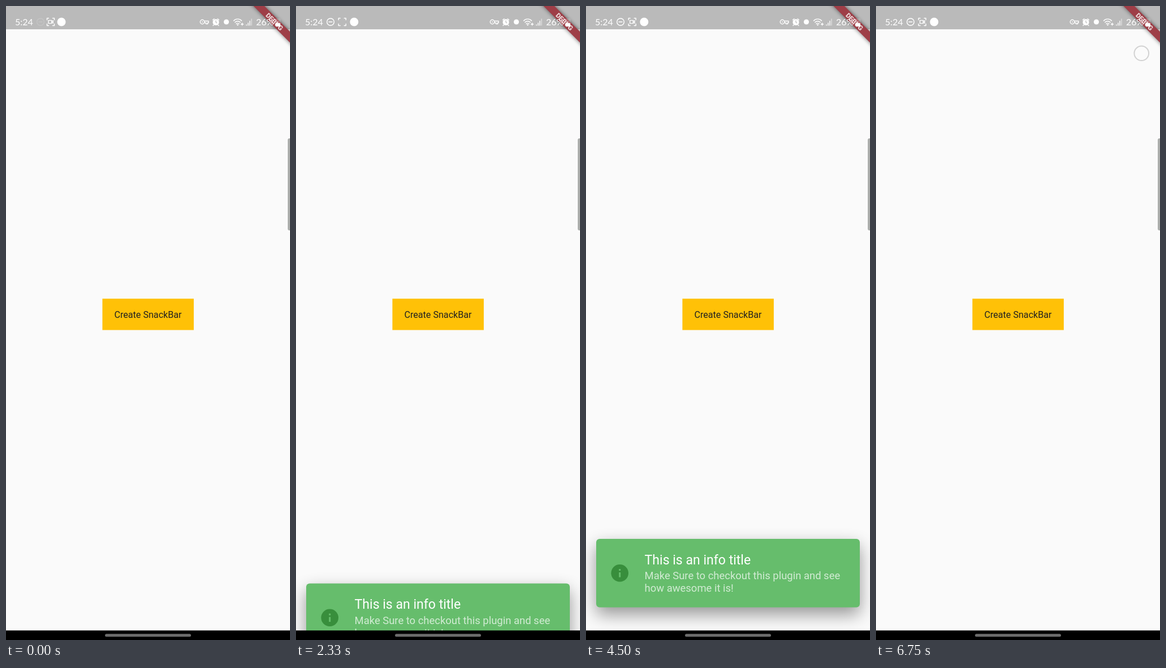
Animation, 502 px wide and 1116 px high, one loop 7010 ms. Source, as an HTML page:

```html
<!DOCTYPE html>
<html lang="en">
<head>
<meta charset="utf-8">
<title>Snackbar demo</title>
<style>
  html, body { margin: 0; width: 100%; height: 100%; overflow: hidden; background: #fafafa; }
  svg { display: block; width: 502px; height: 1116px; }
  text { font-family: Roboto, sans-serif; }
  .clock { font-family: Lato, sans-serif; font-size: 16px; fill: #fff; }
  .line { fill: none; stroke: #fff; stroke-width: 1.4; stroke-linecap: round; stroke-linejoin: round; }
  .solid { fill: #fff; }
</style>
</head>
<body>
<svg viewBox="0 0 502 1116" xmlns="http://www.w3.org/2000/svg">
  <defs>
    <filter id="soft" x="-20%" y="-60%" width="140%" height="220%"><feGaussianBlur stdDeviation="15"/></filter>
    <filter id="edge" x="-20%" y="-100%" width="140%" height="300%"><feGaussianBlur stdDeviation="3.5"/></filter>
  </defs>

  <rect width="502" height="1116" fill="#fafafa"/>
  <rect x="170.4" y="515.2" width="161.5" height="55.2" fill="#ffc107"/>
  <text x="251" y="548.5" font-size="16.14" text-anchor="middle" fill="#212121">Create SnackBar</text>

  <g id="snack">
    <rect x="18" y="950" width="466" height="121" rx="6" opacity=".4" filter="url(#soft)"/>
    <rect x="18" y="938" width="466" height="120.5" rx="6" fill="#66bd6c"/>
    <circle cx="59.7" cy="998.3" r="15.3" fill="#388e3c"/>
    <path d="M58.2 997h3v8.5h-3zM58.2 991h3v3h-3z" fill="#66bd6c"/>
    <text x="103.6" y="982.5" font-size="23.06" fill="#fff">This is an info title</text>
    <g font-size="18.45" fill="#fff" fill-opacity=".7">
      <text x="103.6" y="1009">Make Sure to checkout this plugin and see</text>
      <text x="103.6" y="1031">how awesome it is!</text>
    </g>
  </g>

  <rect width="502" height="41" fill="#bababa"/>

  <g transform="translate(502 0) rotate(45)">
    <rect x="-70" y="32" width="140" height="13.6" opacity=".55" filter="url(#edge)"/>
    <rect x="-70" y="32" width="140" height="13.6" fill="#9e3e47"/>
    <text y="43.1" font-size="11.8" font-weight="900" text-anchor="middle" fill="#fff" fill-opacity=".8">DEBUG</text>
  </g>

  <text class="clock" x="16" y="34">5:24</text>
  <g id="quiet">
    <circle class="line" cx="61" cy="28" r="6.3"/>
    <path class="line" d="M58 28h6"/>
  </g>
  <g id="record">
    <path class="line" d="M-6.5-3.5v-3h3M3.5-6.5h3v3M6.5 3.5v3h-3M-3.5 6.5h-3v-3"/>
    <path id="camera" class="line" d="M-4-2.6h5.6v5.2h-5.6zM1.6-.6l2.6-1.6v4.4l-2.6-1.6"/>
  </g>
  <circle id="chat" class="solid" cy="28" r="7.5"/>

  <circle class="line" cx="347" cy="28" r="3.7"/>
  <path class="line" d="M350.5 26.5h7.5v3h-1.5v2h-3v-2h-3"/>
  <circle class="solid" cx="347" cy="28" r="1"/>
  <circle class="solid" cx="371" cy="28.5" r="5.6"/>
  <path class="line" d="M365.5 24.5l2.5-2M376.5 24.5l-2.5-2M367 33.5l-1 1M375 33.5l1 1"/>
  <path d="M371 25.5v3.2l2 1.3" fill="none" stroke="#bababa" stroke-width="1.2"/>
  <circle class="solid" cx="389.5" cy="28" r="4.6"/>
  <path class="line" d="M402.5 26a9.5 9.5 0 0 1 14 0M404.8 28.8a6.5 6.5 0 0 1 9.4 0M407 31.4a3.5 3.5 0 0 1 5 0M415.5 32h4M417.5 30v4"/>
  <circle class="solid" cx="409.5" cy="33.2" r="1.2"/>
  <path class="line" d="M425 33v1M428 30v4M431 26.5v7.5"/>
  <path class="line" d="M434 23v11" opacity=".55"/>
  <text class="clock" x="442" y="34">26%</text>
  <rect x="476" y="22" width="9.5" height="14" rx="2" fill="#fff" opacity=".2"/>
  <rect x="476.5" y="30" width="8.5" height="6" rx="2" class="solid"/>

  <path d="M502 233h-1a3 3 0 0 0-3 3v156a3 3 0 0 0 3 3h1z" fill="#acaeac"/>
  <circle id="touch" cx="469.3" cy="83.3" r="12.8" fill="#fbfbfb" stroke="#d2d2d2" stroke-width="2"/>

  <rect y="1099.2" width="502" height="17"/>
  <rect x="175" y="1105.3" width="152" height="5" rx="2.5" fill="#6c6c6c"/>
</svg>
<script>
const LOOP = 7010, TICK = 1000 / 12, TRAVEL = 470;
const el = id => document.getElementById(id);
const [snack, quiet, record, camera, chat, touch] =
  ["snack", "quiet", "record", "camera", "chat", "touch"].map(el);
const clamp = v => Math.min(1, Math.max(0, v));
const show = (node, on) => node.setAttribute("visibility", on ? "visible" : "hidden");

// spans in which the recording symbol is blank
const blanks = [[330, 830], [1250, 1420], [2250, 2750], [3250, 3750], [4250, 4420], [5250, 5500], [6250, 6420]];

const cubic = (a, b, u) => 3 * a * u * (1 - u) ** 2 + 3 * b * u * u * (1 - u) + u ** 3;

function easeOutCirc(x) {
  let lo = 0, hi = 1;
  for (let i = 0; i < 24; i++) {
    const mid = (lo + hi) / 2;
    if (cubic(.075, .165, mid) < x) lo = mid; else hi = mid;
  }
  return cubic(.82, 1, lo);
}

function render(now) {
  const t = Math.floor((now % LOOP + 5) / TICK) * TICK;

  const open = t < 3600 ? clamp((t - 2201) / 550) : 1 - clamp((t - 4675) / 280);
  show(snack, open > 0);
  snack.setAttribute("transform", `translate(0 ${((1 - easeOutCirc(open)) * TRAVEL).toFixed(2)})`);

  const p = clamp(t / 166);
  quiet.setAttribute("opacity", .15 + .85 * p);
  record.setAttribute("transform", `translate(${79 + 2.7 * p} 28)`);
  chat.setAttribute("cx", 98 + 4.8 * p);

  show(camera, !blanks.some(([from, to]) => t + 5 >= from && t + 5 < to));
  show(touch, t >= 6745);
}

function loop() {
  render(performance.now());
  requestAnimationFrame(loop);
}
loop();
</script>
</body>
</html>
```
